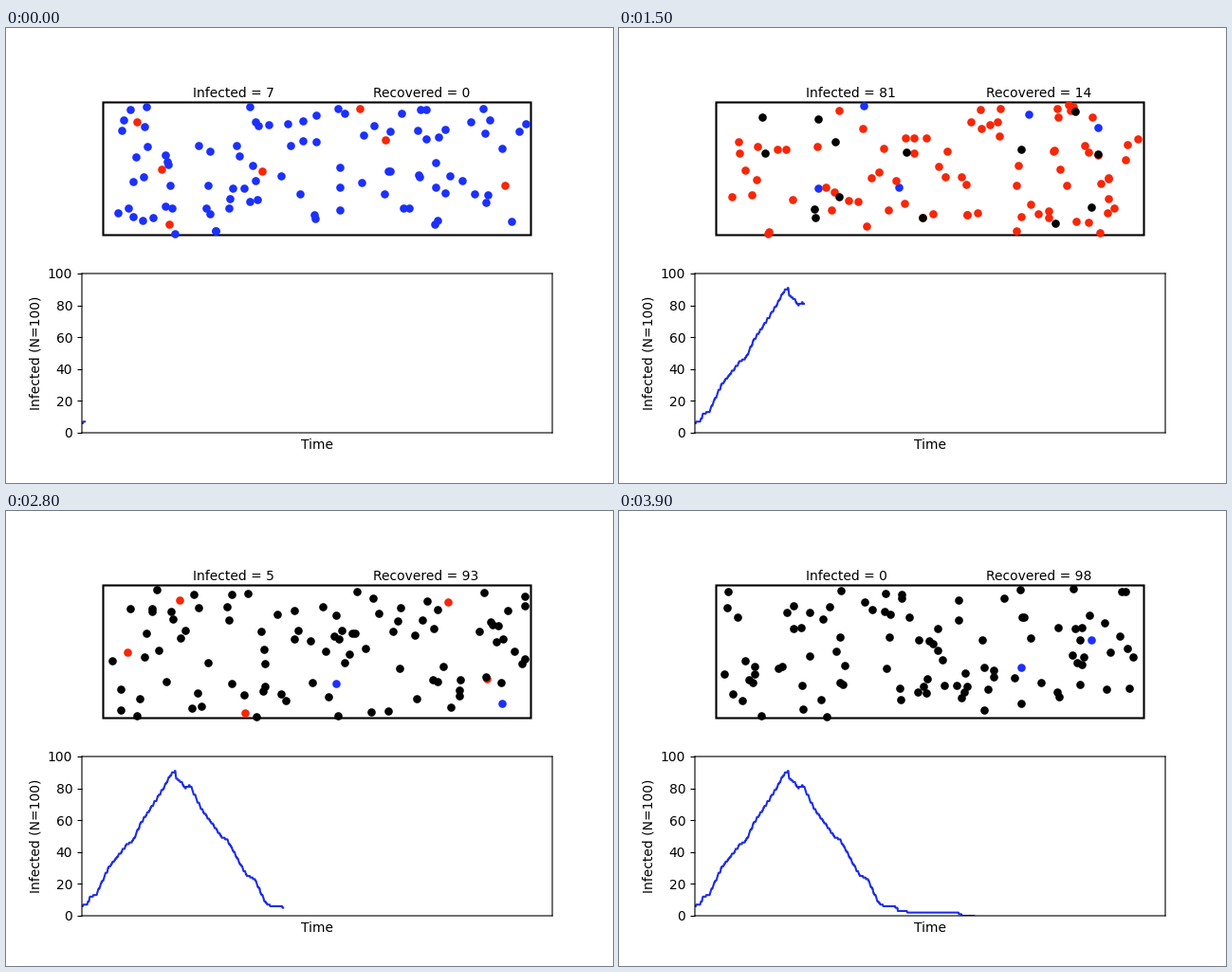
Recreate the animation shown at these times as a matplotlib script. Size 640 by 480 pixels, loop 4000 ms.

```python
import numpy as np
import matplotlib.pyplot as plt
from matplotlib.animation import FuncAnimation
from matplotlib.patches import Rectangle

FRAMES, INTERVAL = 40, 100
COUNT = 100
BLUE, RED, BLACK = "#1c30fb", "#f52708", "#000000"
LOW = np.array([107, 81])      # reach of the dot centres inside the box
HIGH = np.array([549, 217])
FIRST, PACE = 3, 7.47          # chart pixels drawn at the start and per frame
ONSET = 99.2                   # time of the first recoveries

# Turning points of the infected count; one time unit is one chart pixel.
CURVE = np.array([
    (0, 6), (2, 7), (6, 7), (8, 12), (15, 13), (28, 30), (48, 45), (54, 47),
    (62, 58), (83, 77), (95, 90), (99.2, 91), (99.7, 86), (105, 84), (109, 80),
    (114, 82), (126, 67), (148, 49), (153, 48), (173, 26), (182, 23),
    (194, 8), (199, 6), (210, 6), (213, 5), (213.4, 3), (223, 3), (224, 2),
    (276, 2), (281, 1), (282, 0)])

rng = np.random.default_rng(11)
START = rng.uniform(LOW, HIGH, (COUNT, 2))     # in order of infection
SPEED = rng.normal(0, 16, (COUNT, 2))


def dots_at(step):
    """Straight paths, mirrored back inside at the walls."""
    span = HIGH - LOW
    pos = START + SPEED * step
    return LOW + span - np.abs(span - (pos - LOW) % (2 * span))


def infected_at(time):
    """Whole counts; the uneven clock turns the slopes into stairs."""
    beat = (time - FIRST) / PACE
    clock = time - 0.07 * PACE * np.sin(4 * np.pi * beat)
    return np.round(np.interp(clock, *CURVE.T)).astype(int)


def recovered_at(time):
    if time < ONSET:
        return 0
    ever = int(np.interp(time, [99, 115, 212], [91, 95, 98]))
    return ever - int(infected_at(time))


fig = plt.figure(figsize=(6.4, 4.8), dpi=100, facecolor="white")

stage = fig.add_axes([0, 0, 1, 1])
stage.set(xlim=(0, 640), ylim=(480, 0))
stage.axis("off")
stage.add_patch(Rectangle((102.5, 78.5), 451, 140, fill=False,
                          lw=1.5, ec="black", snap=False))
groups = [stage.plot([], [], "o", color=c, ms=6.2, mew=0)[0]
          for c in (BLUE, RED, BLACK)]
infected_text = stage.text(197, 73, "", fontsize=10)
recovered_text = stage.text(387, 73, "", fontsize=10)

chart = fig.add_axes([80 / 640, 53 / 480, 496 / 640, 168 / 480])
chart.set(xlim=(0, 496), ylim=(0, 100), xticks=[],
          xlabel="Time", ylabel="Infected (N=100)")
for spine in chart.spines.values():
    spine.set_snap(False)
line, = chart.plot([], [], color="#1c2ce8", lw=1.5)


def draw(step):
    now = FIRST + PACE * step
    infected, recovered = int(infected_at(now)), recovered_at(now)
    healed, sick, healthy = np.split(dots_at(step),
                                     [recovered, recovered + infected])
    for group, part in zip(groups, (healthy, sick, healed)):
        group.set_data(*part.T)
    infected_text.set_text(f"Infected = {infected}")
    recovered_text.set_text(f"Recovered = {recovered}")
    times = np.append(np.arange(0, now, 0.5), now)
    line.set_data(times, infected_at(times))
    return [*groups, infected_text, recovered_text, line]


anim = FuncAnimation(fig, draw, frames=FRAMES, interval=INTERVAL,
                     repeat=True, repeat_delay=0)
plt.show()
```
